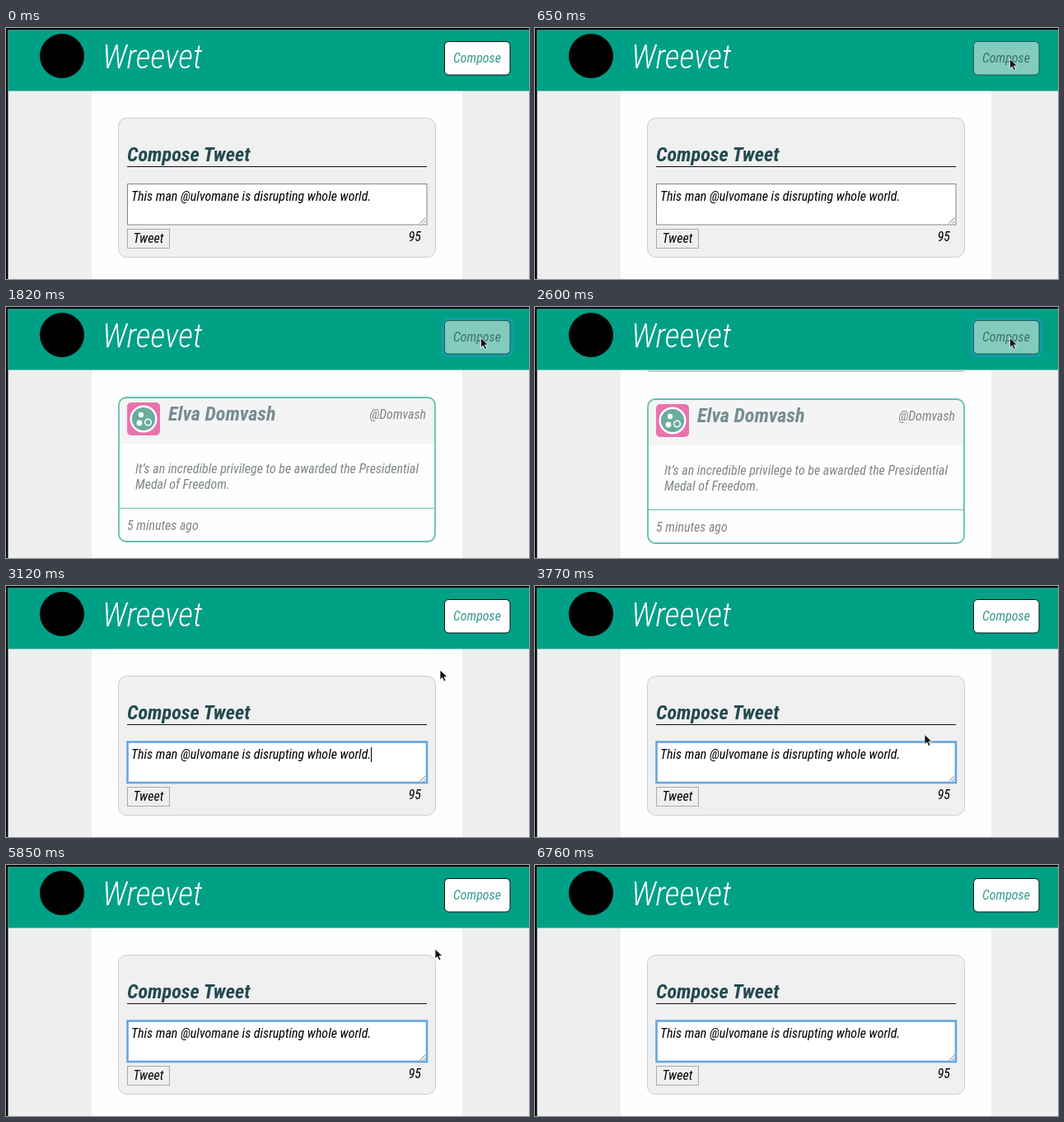
An HTML page that plays this animation: 635x305 px, repeating every 7.28 s.

```html
<!DOCTYPE html>
<html lang="en">
<head>
<meta charset="utf-8">
<title>Compose panel</title>
<style>
  html, body { margin: 0; width: 100%; height: 100%; overflow: hidden; background: #000; }
  svg { display: block; width: 100%; height: 100%; }
  text {
    font: italic 400 16px "Roboto Condensed", Roboto, sans-serif;
    font-stretch: condensed;
    white-space: pre;
    transform: scaleX(var(--narrow, 1));
    transform-box: fill-box;
    transform-origin: left;
  }
  .end { text-anchor: end; transform-origin: right; }
  .title { font-size: 40px; font-weight: 300; fill: #fff; }
  .heading { font-size: 24.3px; font-weight: 700; fill: #234a50; }
  .post text { fill: #7f8686; }
  .post .heading { fill: #758d91; }
  #button rect { fill: #fff; stroke: #111; }
  #button text { fill: #36998b; }
  #button .ring { fill: none; stroke: none; }
  #button.hover .face { fill: #84cbbf; stroke: #1c5d57; }
  #button.hover text { fill: #3c7169; }
  #button.focus .ring { stroke: #169ca6; stroke-width: 3; }
  #area { fill: #fff; stroke: #858585; }
  #area.focus { stroke: #65a6e2; stroke-width: 2.6; }
</style>
</head>
<body>
<svg viewBox="0 0 635 305">
  <defs>
    <clipPath id="fold"><rect id="foldRect" x="130" width="400"/></clipPath>
    <clipPath id="page"><rect x="2" y="76" width="633" height="229"/></clipPath>
  </defs>
  <rect width="635" height="305"/>
  <rect x="2.5" y="2.5" width="632.5" height="302.5" fill="#eeefee"/>
  <rect x="104" y="76" width="450" height="229" fill="#fefefe"/>

  <g clip-path="url(#page)">
    <g id="panel">
      <rect id="panelBox" x="136.5" width="385" rx="10" fill="#f0f0f0" stroke="#ccc"/>
      <!-- Panel contents are placed for the fully open state. -->
      <g clip-path="url(#fold)"><g id="contents">
        <text class="heading" x="147" y="162">Compose Tweet</text>
        <path d="M147 168.5H511" stroke="#111"/>
        <rect id="area" x="147.5" y="189.5" width="363.5" height="49.5"/>
        <path d="M502.5 237.5l7-7M506.5 237.5l3-3" stroke="#888"/>
        <text x="152" y="210.3">This man @ulvomane is disrupting whole world.</text>
        <path id="caret" d="M443.5 196V214" stroke="#000"/>
        <rect x="147.5" y="244.5" width="51" height="23" fill="#efefef" stroke="#aaa"/>
        <text x="154.5" y="261">Tweet</text>
        <text class="end" x="504" y="259">95</text>
      </g></g>
    </g>

    <g id="post" class="post">
      <rect x="137" y="1" width="384" height="175" rx="9" fill="#fefefe"/>
      <path d="M137 57V10a9 9 0 0 1 9-9H512a9 9 0 0 1 9 9V57z" fill="#f4f4f4"/>
      <rect x="137" y="1" width="384" height="175" rx="9" fill="none" stroke="#62c0b0" stroke-width="1.8"/>
      <path d="M137 135.5H521" stroke="#62c0b0"/>
      <rect x="147" y="7" width="40" height="40" rx="5" fill="#e873ae"/>
      <circle cx="167" cy="27" r="15.3" fill="#6aac9e" stroke="#fff" stroke-width="2.4"/>
      <g fill="#fff">
        <circle cx="164" cy="22" r="3.2"/>
        <circle cx="162" cy="32" r="3.4"/>
        <circle cx="172.5" cy="31" r="3.8" fill="none" stroke="#fff" stroke-width="1.5"/>
      </g>
      <text class="heading" x="197" y="29.5">Elva Domvash</text>
      <text class="end" x="510" y="27.5">@Domvash</text>
      <text x="157" y="93">It’s an incredible privilege to be awarded the Presidential</text>
      <text x="157" y="112">Medal of Freedom.</text>
      <text x="147" y="162.5">5 minutes ago</text>
    </g>
  </g>

  <rect x="2.5" y="2.5" width="632.5" height="74" fill="#00a087"/>
  <circle cx="68" cy="34" r="27"/>
  <text class="title" x="117" y="49.5">Wreevet</text>
  <g id="button">
    <rect class="ring" x="530.5" y="14.5" width="84" height="45" rx="7"/>
    <rect class="face" x="532.5" y="16.5" width="79.5" height="40.5" rx="5"/>
    <text x="543" y="42">Compose</text>
  </g>

  <path id="arrow" d="M0 0V12l2.8-2.6 2 4.6 2.2-1-2-4.4H9z" fill="#111" stroke="#fff" stroke-width=".8"/>
  <path id="beam" d="M-2.5-6.5Q0-6.5 0-5Q0-6.5 2.5-6.5M0-5V5M-2.5 6.5Q0 6.5 0 5Q0 6.5 2.5 6.5" fill="none" stroke="#333"/>
  <text id="probe" visibility="hidden">Compose whole world</text>
</svg>

<script>
const $ = id => document.getElementById(id);
const LOOP = 7280, STEP = 130, SLIDE = 400;
const CLOSE_AT = 1334, OPEN_AT = 2592, FOCUS_AT = 3120, BLINK = 520;
const PAGE_TOP = 77, GAP = 32;

// Pointer stops: time, x, y
const stops = [
  [260, 532, 112], [650, 576.5, 37.5], [2990, 576.5, 37.5], [3120, 527, 102],
  [3250, 521, 107], [4030, 457, 205], [4680, 457, 205],
  [5200, 490, 165], [5460, 490, 165], [5850, 521, 102], [6110, 521, 102]
];

const swing = p => 0.5 - Math.cos(Math.PI * Math.min(1, Math.max(0, p))) / 2;
const show = (id, on) => $(id).style.display = on ? '' : 'none';
const move = (id, x, y) => $(id).setAttribute('transform', `translate(${x} ${y})`);
const within = ([x, y], l, t, r, b) => x > l && x < r && y > t && y < b;

function setFace() {
  // Use one common condensed proportion even when only the normal width is installed.
  const measure = css => {
    $('probe').style.cssText = css;
    return $('probe').getComputedTextLength();
  };
  const regular = measure('font-family: Roboto, sans-serif; font-stretch: normal');
  const narrow = Math.min(1, 0.88 * regular / measure(''));
  document.documentElement.style.setProperty('--narrow', narrow);
  $('probe').remove();
}

function pointerAt(t) {
  const i = stops.findIndex(stop => stop[0] > t);
  if (i < 1) return null;
  const [t0, x0, y0] = stops[i - 1], [t1, x1, y1] = stops[i];
  const k = swing((t - t0) / (t1 - t0));
  return [x0 + (x1 - x0) * k, y0 + (y1 - y0) * k];
}

function drawPanel(t) {
  const open = t < OPEN_AT
    ? 1 - swing((t - CLOSE_AT) / SLIDE)
    : swing((t - OPEN_AT) / SLIDE);
  const top = Math.round(PAGE_TOP + 32 * open);
  const height = open ? Math.round(2 + 168 * open) : 0;
  const padding = 10 * open;
  show('panel', open > 0);
  $('panelBox').setAttribute('y', top + 0.5);
  $('panelBox').setAttribute('height', Math.max(0, height - 1));
  $('foldRect').setAttribute('y', top + padding);
  $('foldRect').setAttribute('height', Math.max(0, height - 2 * padding));
  move('contents', 0, Math.round(top - 109 + padding - 10));
  move('post', 0, top + height + GAP);
}

function drawFocus(t) {
  const focused = t >= FOCUS_AT;
  $('area').classList.toggle('focus', focused);
  show('caret', focused && Math.floor((t - FOCUS_AT) / BLINK) % 2 === 0);
  $('button').classList.toggle('focus', t >= 1300 && !focused);
}

function drawPointer(t) {
  const at = pointerAt(t);
  const overText = at && within(at, 147, 190, 511, 239);
  show('arrow', at && !overText);
  show('beam', overText);
  if (at) move(overText ? 'beam' : 'arrow', ...at);
  $('button').classList.toggle('hover', Boolean(at && within(at, 533, 17, 612, 57)));
}

function frame() {
  const t = Math.floor(performance.now() % LOOP / STEP) * STEP;
  drawPanel(t);
  drawFocus(t);
  drawPointer(t);
  requestAnimationFrame(frame);
}

setFace();
frame();
</script>
</body>
</html>
```
